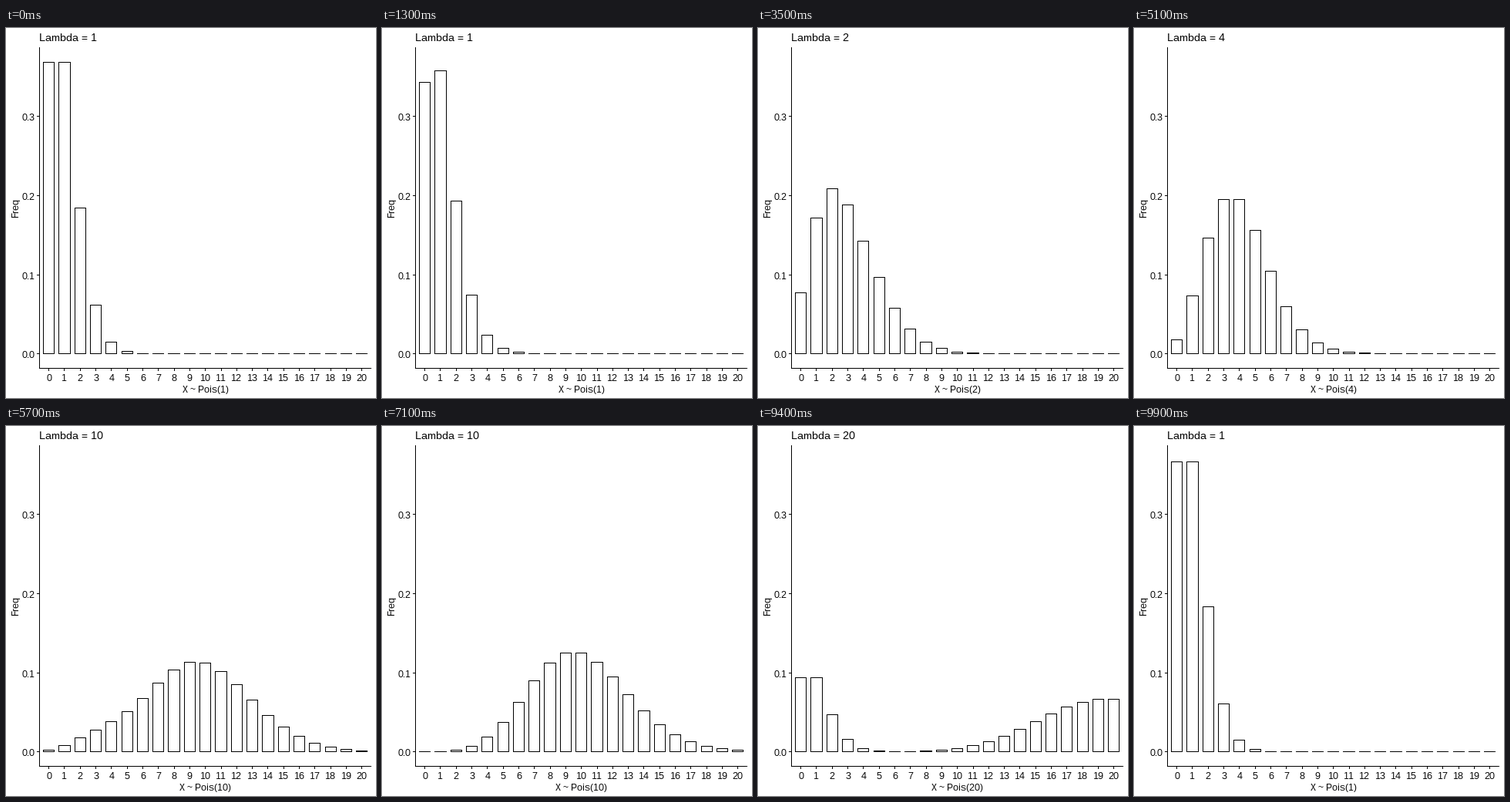
A matplotlib script that plays this animation: 480x480 px, repeating every 10000 ms.

```python
from math import exp, factorial, floor

import matplotlib.pyplot as plt
import numpy as np
from matplotlib.animation import FuncAnimation
from matplotlib.patches import Rectangle

SIZE, DPI = 480, 72
LAMBDAS = [1, 2, 4, 10, 20]
XS = range(21)
STEPS, HOLD = 20, 10              # frames per state, of which still

LEFT, RIGHT, TOP, BOTTOM = 43.4, 474.0, 25, 441
STEP = (RIGHT - LEFT) / 21.2      # distance between bar centres
ZERO, UNIT = 422.8, 1027.5        # baseline and pixels per 1.0
HALF = 0.35 * STEP

plt.rcParams.update({
    "font.family": "Liberation Sans",
    "text.hinting": "native",
    "text.hinting_factor": 1,
})

PMF = np.array([[exp(-m) * m ** x / factorial(x) for x in XS] for m in LAMBDAS])

fig = plt.figure(figsize=(SIZE / DPI, SIZE / DPI), dpi=DPI, facecolor="white")
ax = fig.add_axes([0, 0, 1, 1])
ax.set(xlim=(0, SIZE), ylim=(SIZE, 0))
ax.axis("off")


def block(x, y, w, h, color="black"):
    return ax.add_patch(Rectangle((x, y), w, h, facecolor=color, linewidth=0))


def label(x, y, s, size=12, ha="center", **kw):
    return ax.text(x, y, s, fontsize=size, ha=ha, va="baseline", **kw)


def center(x):
    return LEFT + (0.6 + x) * STEP


def row(value):
    return floor(ZERO - value * UNIT)


def ease(p):
    return 4 * p ** 3 if p < 0.5 else 1 - 4 * (1 - p) ** 3


# Axes, ticks and labels
block(floor(LEFT), TOP, 1, BOTTOM - TOP + 1)
block(floor(LEFT), BOTTOM, floor(RIGHT) - floor(LEFT), 1)
for i in range(4):
    y = row(i / 10)
    block(40, y, 3, 1)
    label(37.5, y + 6, f"{i / 10:.1f}", ha="right")
for x in XS:
    block(floor(center(x)), BOTTOM + 1, 1, 3)
    label(center(x), 458, str(x))
label(16, 233.5, "Freq", rotation=90, rotation_mode="anchor")
title = label(LEFT, 17, "", size=14, ha="left")
xlabel = label((LEFT + RIGHT) / 2, 473, "")

# Each bar is a black block with a white one inside
bars = []
for x in XS:
    x0, x1 = floor(center(x) - HALF), floor(center(x) + HALF)
    bars.append((block(x0, 0, x1 - x0 + 1, 1),
                 block(x0 + 1, 0, x1 - x0 - 1, 0, "white")))


def draw(frame):
    state, k = divmod(frame, STEPS)
    after = (state + 1) % len(LAMBDAS)
    p = max(0, k - HOLD) / (STEPS - HOLD)
    t = ease(p)
    values = PMF[state] * (1 - t) + PMF[after] * t
    base = row(0)
    for (outer, inner), v in zip(bars, values):
        top = row(v)
        outer.set_y(top)
        outer.set_height(base - top + 1)
        inner.set_y(top + 1)
        inner.set_height(max(0, base - top - 1))
    lam = LAMBDAS[state if p <= 0.5 else after]
    title.set_text(f"Lambda = {lam}")
    xlabel.set_text(f"X ~ Pois({lam})")
    return []


anim = FuncAnimation(fig, draw, frames=STEPS * len(LAMBDAS), interval=100,
                     repeat=True, repeat_delay=0, blit=False)
plt.show()
```
